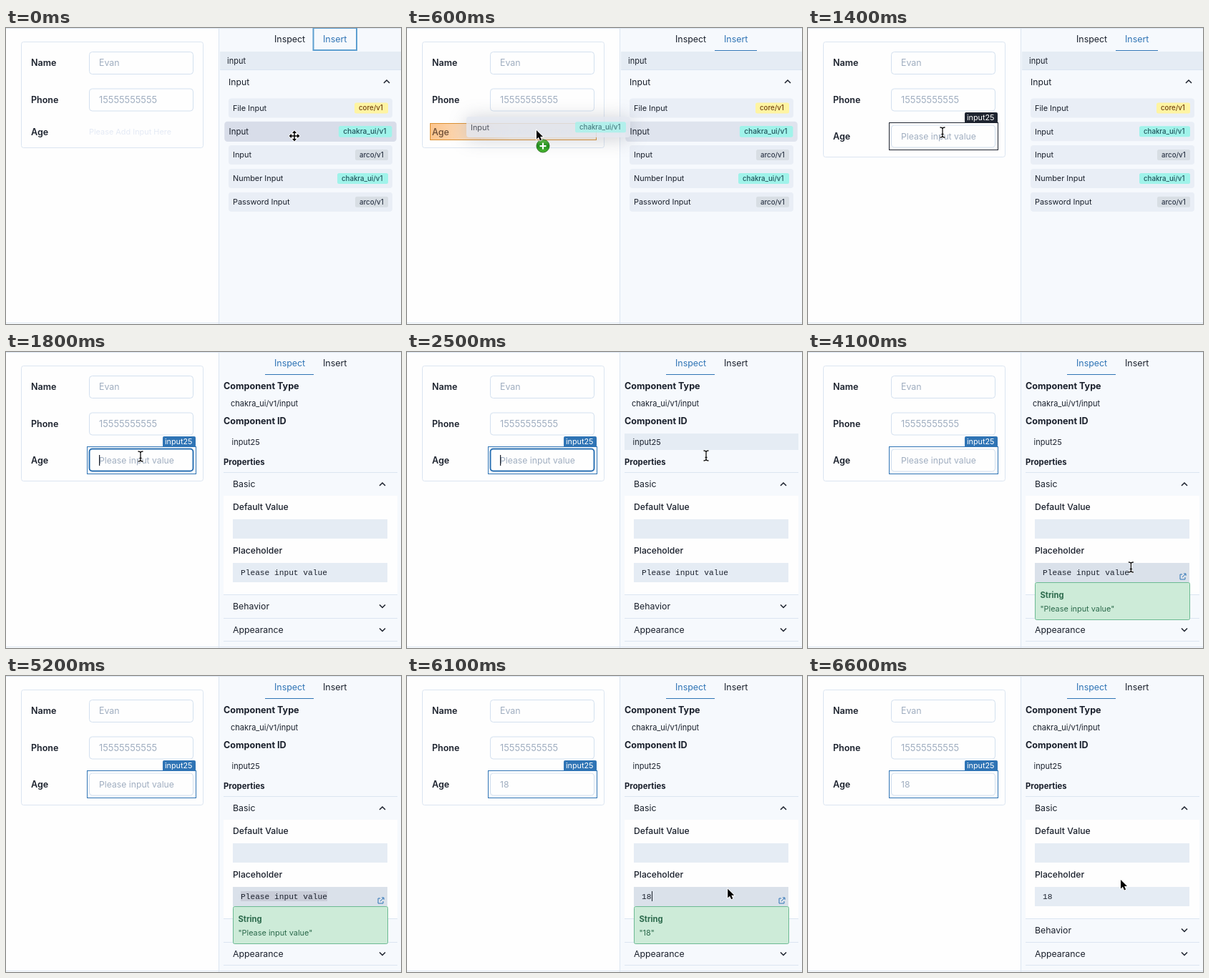
An HTML page with a canvas for the animation above (6800 ms loop, 552 by 414 pixels).

```html
<!DOCTYPE html>
<html lang="en">
<head>
<meta charset="utf-8">
<title>Form builder</title>
<style>
html, body { margin: 0; width: 100%; height: 100%; overflow: hidden; background: #fefefe; }
canvas { display: block; width: 552px; height: 414px; }
</style>
</head>
<body>
<canvas id="stage"></canvas>
<script>
const W = 552, H = 414, LOOP = 6800, STEP = 100;
const SANS = 'Inter, "Open Sans", sans-serif';
const MONO = '"Liberation Mono", monospace';
const C = {
  page: '#fefefe', panel: '#f6f9fd', line: '#dbe5f1', ink: '#1a202c', blue: '#2f74b5',
  fill: '#e9eef6', hover: '#d8dde9', field: '#e5ecf4', fieldHover: '#dae1ea',
  hint: '#a0aec0', faint: '#e4eaf5', black: '#1e2430',
  tip: '#cdebd8', tipLine: '#6cba93', tipInk: '#2c6a4c'
};
const BADGES = {
  'core/v1': ['#fef4a2', '#744210', 487, 47],
  'chakra_ui/v1': ['#a0f3ea', '#22555c', 463, 71],
  'arco/v1': ['#d8dee4', '#2d3748', 488, 46]
};
const ROWS = [
  ['File Input', 'core/v1'], ['Input', 'chakra_ui/v1'], ['Input', 'arco/v1'],
  ['Number Input', 'chakra_ui/v1'], ['Password Input', 'arco/v1']
];
// time at which each state begins
const T = {
  drag: 100, drop: 1000, outline: 1200, select: 1700, idHover: 2400, idLeave: 2900,
  fieldHover: 3300, edit: 3800, pick: 5200, type: 5300, apply: 5500, tip: 5800, close: 6300, leave: 6500
};
// pointer path: time, x, y
const PATH = [
  [0, 403, 151], [100, 390, 150], [600, 181, 143], [800, 181, 143], [1000, 184, 147],
  [1400, 188, 146], [2100, 188, 146], [2500, 418, 145], [2800, 436, 190], [3500, 458, 301],
  [4200, 451, 301], [5900, 451, 301], [6600, 437, 285], [6800, 437, 285]
];

const canvas = document.getElementById('stage');
const g = canvas.getContext('2d');
const dpr = window.devicePixelRatio || 1;
canvas.width = W * dpr;
canvas.height = H * dpr;

function text(s, x, cy, size, color = C.ink, weight = 400, family = SANS) {
  g.font = `${weight} ${size}px ${family}`;
  g.fillStyle = color;
  g.fillText(s, x, cy + size * 0.36);
}

function rect(x, y, w, h, color) {
  g.fillStyle = color;
  g.fillRect(x, y, w, h);
}

function box(x, y, w, h, r, fill, stroke, lw = 1) {
  g.beginPath();
  g.roundRect(x, y, w, h, r);
  if (fill) { g.fillStyle = fill; g.fill(); }
  if (stroke) { g.strokeStyle = stroke; g.lineWidth = lw; g.stroke(); }
}

function poly(points, color, lw, close) {
  g.beginPath();
  points.forEach(([x, y]) => g.lineTo(x, y));
  if (close) g.closePath();
  g.strokeStyle = color;
  g.lineWidth = lw;
  g.stroke();
}

function chevron(x, y, up) {
  const d = up ? -2 : 2;
  poly([[x - 4, y - d], [x, y + d], [x + 4, y - d]], C.ink, 1.5);
}

function pointer(t) {
  let i = 0;
  while (i < PATH.length - 2 && t >= PATH[i + 1][0]) i++;
  const [t0, x0, y0] = PATH[i], [t1, x1, y1] = PATH[i + 1];
  const k = (t - t0) / (t1 - t0), e = k * k * (3 - 2 * k);
  return [x0 + (x1 - x0) * e, y0 + (y1 - y0) * e];
}

function formRow(label, y, hint, size) {
  text(label, 35, y - 0.4, 12.5, C.ink, 600);
  box(116.5, y - 15.5, 145, 31, 4, null, '#d3e0ef');
  text(hint, 130, y, size, C.hint);
}

function drawForm(t) {
  const dropped = t >= T.drop;
  box(21.5, 19.5, 254, dropped ? 161 : 148, 3, null, C.line);
  formRow('Name', 49, 'Evan', 12.4);
  formRow('Phone', 100.5, '15555555555', 12.8);
  if (!dropped) {
    if (t >= 500) {
      const glow = g.createLinearGradient(32, 0, 265, 0);
      glow.addColorStop(0, '#fcc48c');
      glow.addColorStop(0.22, '#fcdcbc');
      glow.addColorStop(0.5, '#fdf3e6');
      glow.addColorStop(1, '#fdf3e6');
      rect(32, 133, 233, 24, glow);
      g.strokeStyle = '#dc9030';
      g.lineWidth = 1;
      g.strokeRect(32.5, 133.5, 232, 23);
    }
    text('Age', 35, 145, 12.5, t >= 500 ? '#6b4c34' : C.ink, t >= 500 ? 500 : 600);
    text('Please Add Input Here', 116, 145, 10.9, C.faint);
    return;
  }
  formRow('Age', 151.5, t >= T.apply ? '18' : 'Please input value', 12.2);
  if (t < T.outline) return;
  const color = t >= T.select ? C.blue : C.black;
  g.strokeStyle = color;
  g.lineWidth = 1;
  g.strokeRect(113.5, 132.5, 152, 38);
  box(219, 118, 46, 15, [2, 2, 0, 0], color);
  text('input25', 222, 125.3, 10.8, '#fff');
  if (t >= T.select && t < T.edit) {
    box(116.5, 135.5, 145, 31, 4, null, C.blue, 2);
    rect(130, 144, 1.2, 15, C.ink);
  }
}

function listRow(name, tag, y, fill) {
  box(311, y - 13, 229, 27, 4, fill);
  text(name, 317, y + 0.4, 10.9);
  const [bg, ink, x, w] = BADGES[tag];
  box(x, y - 7, w, 15, 2.5, bg);
  text(tag, x + 6, y + 0.5, 9.7, ink, 500);
}

function drawTabs(inspect) {
  text('Inspect', 375, 15.3, 12.4, inspect ? C.blue : C.ink);
  text('Insert', 443, 15.3, 12.4, inspect ? C.ink : C.blue);
  rect(inspect ? 362 : 430, 31, inspect ? 68 : 59, 1, C.blue);
}

function drawInsert(t) {
  drawTabs(false);
  if (t < T.drag) {
    g.strokeStyle = '#5d9fd0';
    g.lineWidth = 2;
    g.strokeRect(429.5, 0, 60.5, 31);
  }
  rect(299, 33, 253, 26, C.field);
  rect(299, 58, 253, 1, C.line);
  text('input', 309, 45.7, 11);
  text('Input', 311, 75.2, 12.2);
  chevron(532, 75, true);
  ROWS.forEach(([name, tag], i) => {
    const y = 111.5 + i * 32.8;
    g.save();
    if (i === 1 && t < T.drop) {
      g.translate(425.5, y);
      g.scale(1.05, 1.05);
      g.translate(-425.5, -y);
      listRow(name, tag, y, t < T.drag ? C.hover : '#dfe4ee');
    } else {
      listRow(name, tag, y, C.fill);
    }
    g.restore();
  });
}

function section(name, y, open) {
  text(name, 317, y, 12.3);
  chevron(526, y, open);
}

function drawInspect(t) {
  const editing = t >= T.edit && t < T.close;
  const lit = t >= T.fieldHover && t < T.leave;
  const value = t >= T.type ? '18' : 'Please input value';
  drawTabs(true);
  text('Component Type', 304, 47.5, 12.6, C.ink, 700);
  text('chakra_ui/v1/input', 314, 72.5, 11);
  text('Component ID', 304, 96.5, 12.6, C.ink, 700);
  if (t >= T.idHover && t < T.idLeave) rect(304, 114, 243, 23, C.field);
  text('input25', 315.5, 126, 11);
  text('Properties', 304, 153.5, 11.3, C.ink, 700);
  rect(304, 201, 243, 138, C.page);
  [168, 339, 372, 404].forEach(y => rect(304, y, 243, 1, C.line));
  section('Basic', 185, true);
  text('Default Value', 317, 217, 12.2, C.ink, 500);
  rect(317, 234, 216, 27, C.field);
  text('Placeholder', 317, 278, 12.2, C.ink, 500);
  rect(317, 295, 216, 27, lit ? C.fieldHover : C.field);
  if (t >= T.pick && t < T.type) rect(328, 301, 121, 14, '#c9cdd8');
  text(value, 328, 308, 11.2, C.ink, 400, MONO);
  if (editing && t >= T.type) rect(342, 301, 1, 14, C.ink);
  if (lit) {
    poly([[523, 311], [520, 311], [520, 318], [527, 318], [527, 315]], C.blue, 1);
    poly([[523, 315], [528, 310]], C.blue, 1);
    poly([[525, 310], [528, 310], [528, 313]], C.blue, 1);
  }
  section('Behavior', 355.5, false);
  section('Appearance', 388.5, false);
  if (editing) {
    box(317.5, 322.5, 216, 52, 2, C.tip, C.tipLine);
    text('String', 324.5, 339.5, 11.2, C.tipInk, 700);
    text(t >= T.tip ? '"18"' : '"Please input value"', 324.5, 359.5, 10.9, C.tipInk);
  }
}

function drawGhost(x, y) {
  g.save();
  g.translate(x - 181 - 228, y - 143 - 6);
  g.globalAlpha = 0.82;
  g.shadowColor = 'rgba(120, 125, 140, 0.45)';
  g.shadowBlur = 26 * dpr;
  g.shadowOffsetY = 2 * dpr;
  box(311, 130, 229, 29, 4, '#e6eaf2');
  g.shadowColor = 'transparent';
  g.globalAlpha = 0.72;
  listRow('Input', 'chakra_ui/v1', 144.3, null);
  g.restore();
}

function arrow() {
  g.beginPath();
  [[0, 0], [0, 12.5], [2.9, 9.8], [5, 14.4], [7.1, 13.4], [5.1, 9], [9, 9]].forEach(p => g.lineTo(...p));
  g.closePath();
  g.lineWidth = 1.6;
  g.strokeStyle = '#fff';
  g.stroke();
  g.fillStyle = '#000';
  g.fill();
}

function beam() {
  for (const [color, lw] of [['#fff', 2.6], ['#111', 1.3]]) {
    g.strokeStyle = color;
    g.lineWidth = lw;
    g.beginPath();
    for (const s of [-1, 1]) {
      g.moveTo(-3.5, 7 * s);
      g.quadraticCurveTo(0, 7 * s, 0, 5 * s);
      g.quadraticCurveTo(0, 7 * s, 3.5, 7 * s);
    }
    g.moveTo(0, -5.5);
    g.lineTo(0, 5.5);
    g.moveTo(-1.5, 2.5);
    g.lineTo(1.5, 2.5);
    g.stroke();
  }
}

function moveCross() {
  for (const [color, lw] of [['#fff', 3.4], ['#000', 1.5]]) {
    for (let i = 0; i < 4; i++) {
      g.rotate(Math.PI / 2);
      poly([[0, 0], [0, -6]], color, lw);
      g.beginPath();
      g.moveTo(0, -7.5);
      g.lineTo(3, -4);
      g.lineTo(-3, -4);
      g.closePath();
      g.fillStyle = color;
      g.fill();
      if (lw > 2) { g.lineWidth = 1.6; g.stroke(); }
    }
  }
}

function plusBadge() {
  const green = g.createLinearGradient(0, 13, 0, 31);
  green.addColorStop(0, '#66b84a');
  green.addColorStop(0.5, '#1d8c1c');
  green.addColorStop(1, '#4fbd32');
  g.beginPath();
  g.arc(9, 22, 9, 0, Math.PI * 2);
  g.fillStyle = green;
  g.fill();
  g.strokeStyle = '#2c7424';
  g.lineWidth = 1;
  g.stroke();
  rect(4.5, 21, 9, 2.2, '#fff');
  rect(7.9, 17.6, 2.2, 9, '#fff');
}

function drawPointer(t, x, y) {
  if (t >= T.pick && t < 6000) return;
  g.save();
  g.translate(x, y);
  if (t < T.drag) moveCross();
  else if (t < T.outline || t >= 6000) {
    if (t >= 500 && t < T.drop) plusBadge();
    arrow();
  } else beam();
  g.restore();
}

function draw(t) {
  g.setTransform(dpr, 0, 0, dpr, 0, 0);
  rect(0, 0, W, H, C.page);
  rect(298, 0, 254, H, C.panel);
  rect(297, 0, 1, H, C.line);
  rect(0, 0, W, 1, C.line);
  rect(0, 412, W, 1, C.line);
  drawForm(t);
  if (t < T.select) drawInsert(t);
  else drawInspect(t);
  const [x, y] = pointer(t);
  if (t >= T.drag && t < T.drop) drawGhost(x, y);
  drawPointer(t, x, y);
}

const start = performance.now();
function tick() {
  const t = (performance.now() - start) % LOOP;
  draw(Math.floor(t / STEP) * STEP);
  requestAnimationFrame(tick);
}
tick();
</script>
</body>
</html>
```
